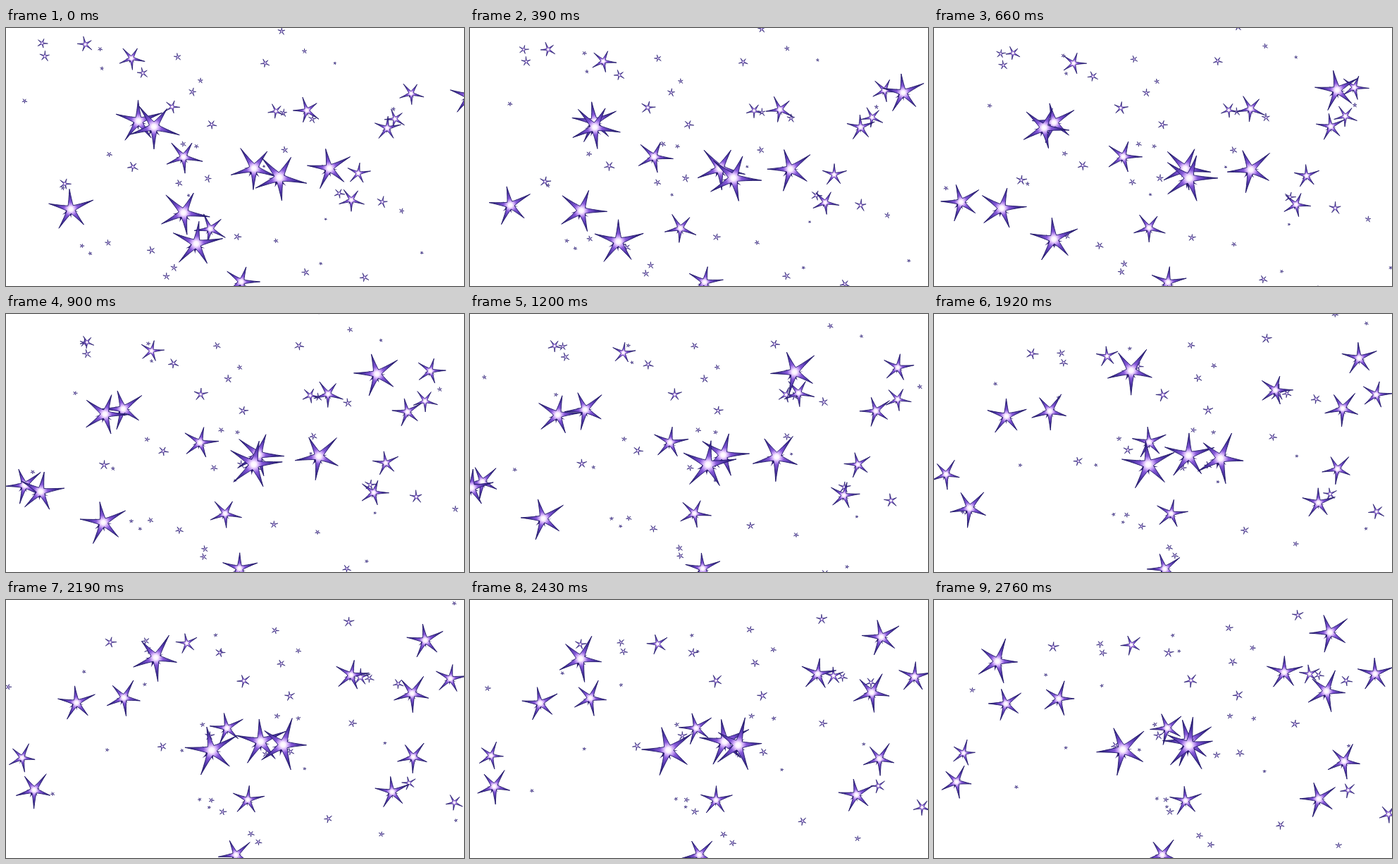
An HTML page with a canvas that plays this animation: 650 px wide and 366 px high, repeating every 2.79 s.

```html
<!DOCTYPE html>
<html lang="en">
<head>
<meta charset="utf-8">
<title>Turning star field</title>
<style>
  html, body { margin: 0; width: 100%; height: 100%; overflow: hidden; background: #fff; }
  canvas { display: block; }
</style>
</head>
<body>
<canvas id="sky" width="650" height="366"></canvas>
<script>
const ctx = document.getElementById('sky').getContext('2d');
const W = 650, H = 366, CX = W / 2, CY = H / 2;
const VIEW = 490;      // distance from camera to the axis of the field
const SPIN = 0.0102;   // radians per step
const PITCH = 0.04;    // the camera looks slightly down on the field
const LAST = 91, STEP = 30, LOOP = 2790;
const FAR_STARS = 50;

// Nearby stars: x and y at the first step, x at the last, first turn in degrees.
const nearby = [
  [352, 199, 361, 20], [334, 360, 324, 0], [459, 199, 362, -29], [188, 132, 177, -19],
  [388, 212, 268, 12], [270, 306, 32, -11], [92, 257, 42, -22], [290, 285, 357, 30],
  [210, 140, 102, 18], [541, 142, 557, -14], [500, 206, 582, -10], [490, 244, 546, 18],
  [252, 183, 331, 13], [178, 43, 280, 13], [252, 262, -65, 9], [657, 97, 90, -17],
  [552, 129, 626, 33], [575, 93, 562, 15], [427, 117, 497, 36], [383, 118, 533, 26]
];

let seed = 11;
function random(low, high) {
  seed = (seed * 16807) % 2147483647;
  return low + (high - low) * seed / 2147483647;
}

// Recover the place in space that gives both sightings under the shared spin.
function nearStar([x0, y0, x1, turn]) {
  const c = Math.cos(SPIN * LAST), s = Math.sin(SPIN * LAST);
  const a = (x0 - CX) / VIEW, b = (x1 - CX) / VIEW, m = a * (c + b * s);
  const z = (b - m) / (m + s - b * c), x = a * (1 + z);
  const y = (y0 - CY) / VIEW * (1 + z) + PITCH * z;
  return { x, y, z, turn: turn * Math.PI / 180, size: 38 - 40 * Math.hypot(x, y, z) };
}

// Scatter a star over the far half of the field; the outer ones are smaller.
function farStar() {
  const orbit = random(0.4, 0.85);
  const bearing = random(-1.7, 1.7) - SPIN * LAST / 2;
  const z = orbit * Math.cos(bearing);
  return {
    x: orbit * Math.sin(bearing),
    y: random(-0.36, 0.36) * (1 + z),
    z,
    turn: random(0, Math.PI * 0.4),
    size: 22 * (1 - orbit) * random(0.5, 1.1)
  };
}

function project({ x, y, z, turn, size }, i) {
  const c = Math.cos(SPIN * i), s = Math.sin(SPIN * i);
  const across = x * c + z * s, away = z * c - x * s, depth = 1 + away;
  return {
    depth,
    x: CX + VIEW * across / depth,
    y: CY + VIEW * (y - PITCH * away) / depth,
    r: Math.max(1.2, size / depth),
    turn: turn - SPIN * i
  };
}

// Five needles that flare into a small round core.
function spikes(r, turn, waist) {
  const point = (radius, angle) => [radius * r * Math.cos(angle), radius * r * Math.sin(angle)];
  const fifth = Math.PI * 0.4;
  ctx.beginPath();
  for (let n = 0; n < 5; n++) {
    const tip = turn + n * fifth;
    const length = 1 + 0.1 * Math.cos(n * 2.5);
    ctx.lineTo(...point(length, tip));
    ctx.quadraticCurveTo(...point(0.36, tip + 0.2), ...point(waist, tip + fifth / 2));
    ctx.quadraticCurveTo(...point(0.36, tip + fifth - 0.2),
      ...point(1 + 0.1 * Math.cos((n + 1) % 5 * 2.5), tip + fifth));
  }
  ctx.closePath();
}

function glow(r) {
  const g = ctx.createRadialGradient(0, 0, 0, 0, 0, r);
  g.addColorStop(0, '#fff');
  g.addColorStop(0.1, '#fbf0ff');
  g.addColorStop(0.2, '#cba6f6');
  g.addColorStop(0.32, '#8558d8');
  g.addColorStop(0.6, '#4e35a6');
  g.addColorStop(1, '#1c1560');
  return g;
}

function drawStar({ x, y, r, turn }) {
  ctx.save();
  ctx.translate(x, y);
  ctx.lineJoin = 'bevel';
  if (r > 17) {
    ctx.save();
    ctx.translate(-0.05 * r, 0.06 * r);
    spikes(r * 0.38, turn + 0.5, 0.5);
    ctx.fillStyle = '#2e1d72';
    ctx.fill();
    ctx.restore();
  }
  spikes(r, turn, 0.2);
  ctx.fillStyle = glow(r);
  ctx.fill();
  ctx.strokeStyle = '#21176a';
  ctx.lineWidth = Math.min(0.9, 0.5 + r / 60);
  ctx.stroke();
  ctx.restore();
}

const stars = [...nearby.map(nearStar), ...Array.from({ length: FAR_STARS }, farStar)];

function drawField(time) {
  const i = Math.max(0, Math.floor((time % LOOP) / STEP) - 1);
  ctx.fillStyle = '#fff';
  ctx.fillRect(0, 0, W, H);
  stars.map(star => project(star, i))
    .filter(view => view.depth > 0.1)
    .sort((p, q) => q.depth - p.depth)
    .forEach(drawStar);
}

const start = performance.now();
function tick() {
  drawField(performance.now() - start);
  requestAnimationFrame(tick);
}
tick();
</script>
</body>
</html>
```
